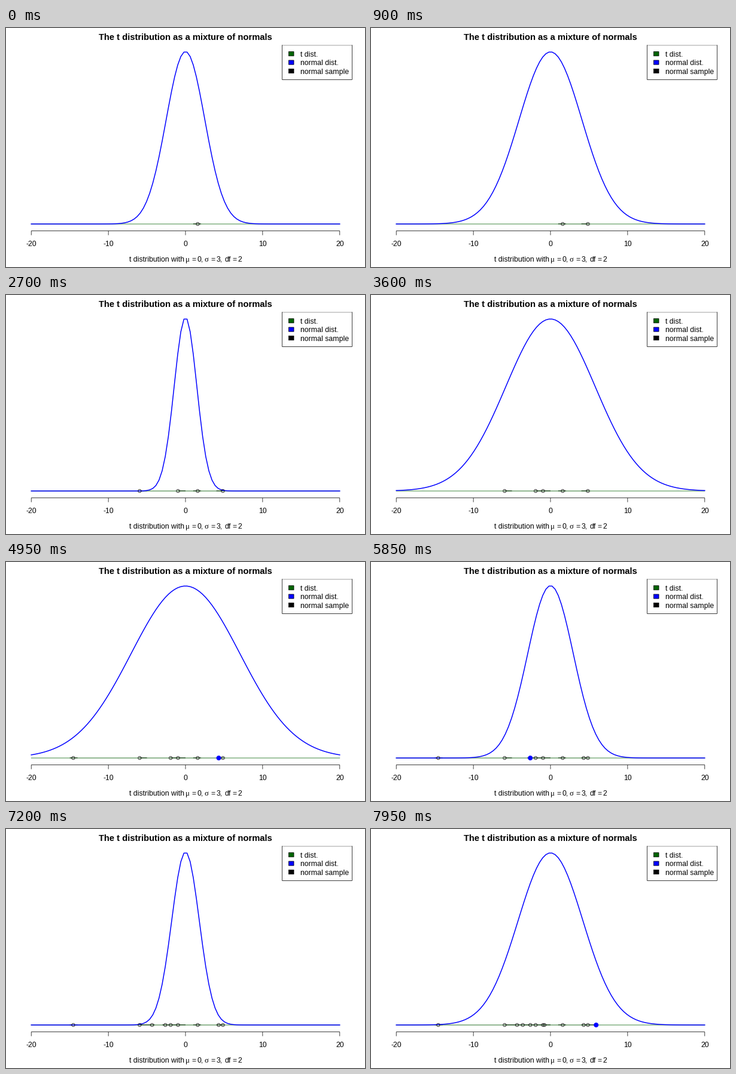
A matplotlib script for the animation above (8000 ms loop, 600 by 400 pixels).

```python
import numpy as np
import matplotlib.pyplot as plt
from matplotlib.animation import FuncAnimation
from matplotlib.patches import Circle, Rectangle

plt.rcParams.update({
    "font.family": "Liberation Sans",
    "text.hinting": "force_autohint",
    "text.hinting_factor": 8,
    "path.snap": False,
})

W, H, DPI = 600, 400, 100
PT = 72 / DPI                      # points per pixel
LEFT, TOP, RIGHT, BOTTOM = 21.6, 28.8, 578.4, 339.52
BASE, PEAK = 328.01, 40.31
UNIT = (RIGHT - LEFT) / 1.08 / 40  # pixels per x unit
HAIR = 0.75 * PT
TEXT, TITLE = 12.3, 14.7

SIGMAS = [2.5, 4.07, 2.35, 1.46, 5.8, 7.06, 2.95, 3.04, 1.78, 3.33, 4.2]
SAMPLES = [1.59, 4.85, -0.97, -5.94, -1.92, -14.56,
           4.31, -2.62, -4.34, -0.78, -3.59, 5.92]
GRID = np.linspace(-20, 20, 100)
TICK = 50                          # ms per drawn frame
LOOP = 8000


def px(x):
    return W / 2 + UNIT * np.asarray(x)


fig = plt.figure(figsize=(W / DPI, H / DPI), dpi=DPI, facecolor="white")
ax = fig.add_axes([0, 0, 1, 1])
ax.set_xlim(0, W)
ax.set_ylim(H, 0)
ax.axis("off")


def line(xs, ys, color="black", width=HAIR, **kw):
    return ax.plot(xs, ys, color=color, lw=width, **kw)[0]


def label(x, y, text, size=TEXT, **kw):
    return ax.text(x, y, text, size=size * PT, va="baseline", **kw)


def draw_axis():
    line(px([-20, 20]), [BOTTOM, BOTTOM], solid_capstyle="butt")
    for v in range(-20, 21, 10):
        x = float(px(v))
        line([x, x], [BOTTOM, BOTTOM + 7.2], solid_capstyle="butt")
        label(x, 365, str(v), ha="center")


def draw_legend():
    x, low = 461.6, TOP + 57.6
    line([x, x, RIGHT, RIGHT], [TOP, low, low, TOP])
    # the plot region clips the upper half of the top border
    line([x, RIGHT], [TOP + 0.19] * 2, width=HAIR / 2)
    rows = [("t dist.", "darkgreen"), ("normal dist.", "blue"), ("normal sample", "black")]
    for i, (name, color) in enumerate(rows):
        y = TOP + 14.4 * (i + 1)
        ax.add_patch(Rectangle((x + 10.8, y - 3.6), 8.64, 7.2, fc=color, ec="black", lw=HAIR))
        label(492, round(y + 4.6), name)


def draw_caption():
    label(206, 391, "t distribution with")
    for x, letter in [(300, "μ"), (332, "σ")]:
        label(x, 391, letter, 13, family="Liberation Serif")
    for x, text in [(310, "="), (319, "0,"), (342, "="), (352, "3,"),
                    (366, "df"), (378, "="), (387, "2")]:
        label(x, 391, text)


label(W / 2, 20, "The t distribution as a mixture of normals", TITLE,
      weight="bold", ha="center")
draw_axis()
draw_legend()
draw_caption()

empty_bins = line([], [], alpha=0.2, zorder=3, solid_capstyle="butt")
full_bins = line([], [], width=1.3 * HAIR, zorder=3, solid_capstyle="butt")
line(px([-20, 20]), [BASE, BASE], "darkgreen", zorder=4)
curve = line([], [], "blue", 1.5 * PT, zorder=5, solid_joinstyle="round")
rings = [ax.add_patch(Circle((px(s), BASE), 2.7, fill=False, ec="black", lw=HAIR, zorder=6))
         for s in SAMPLES]
dot = ax.add_patch(Circle((0, BASE), 3.6, fc="blue", ec="blue", lw=HAIR, zorder=7))


def set_bins(artist, bins, lift=0):
    xs = [v for b in bins for v in (px(b), px(b + 1), np.nan)]
    artist.set_data(xs, [BASE - lift] * len(xs))


def step_at(ms):
    return ms // 450 if ms < 7200 else 16 + (ms - 7200) // 150


def update(frame):
    step = step_at(frame * TICK)
    round_no, drawing = divmod(step, 2)
    old = round_no + 1             # samples already drawn as rings
    total = old + drawing

    dens = np.exp(-0.5 * (GRID / SIGMAS[round_no]) ** 2)
    curve.set_data(px(GRID), BASE - (BASE - PEAK) * dens / dens.max())

    full = {int(np.floor(s)) for s in SAMPLES[:total]}
    set_bins(full_bins, sorted(full), lift=0.2)
    set_bins(empty_bins, [b for b in range(min(full), max(full)) if b not in full])

    for i, ring in enumerate(rings):
        ring.set_visible(i < old)
    dot.set_visible(bool(drawing))
    if drawing:
        dot.center = (float(px(SAMPLES[old])), BASE)
    return [curve, full_bins, empty_bins, dot, *rings]


anim = FuncAnimation(fig, update, frames=LOOP // TICK, interval=TICK,
                     repeat=True, repeat_delay=0, blit=False)
plt.show()
```
